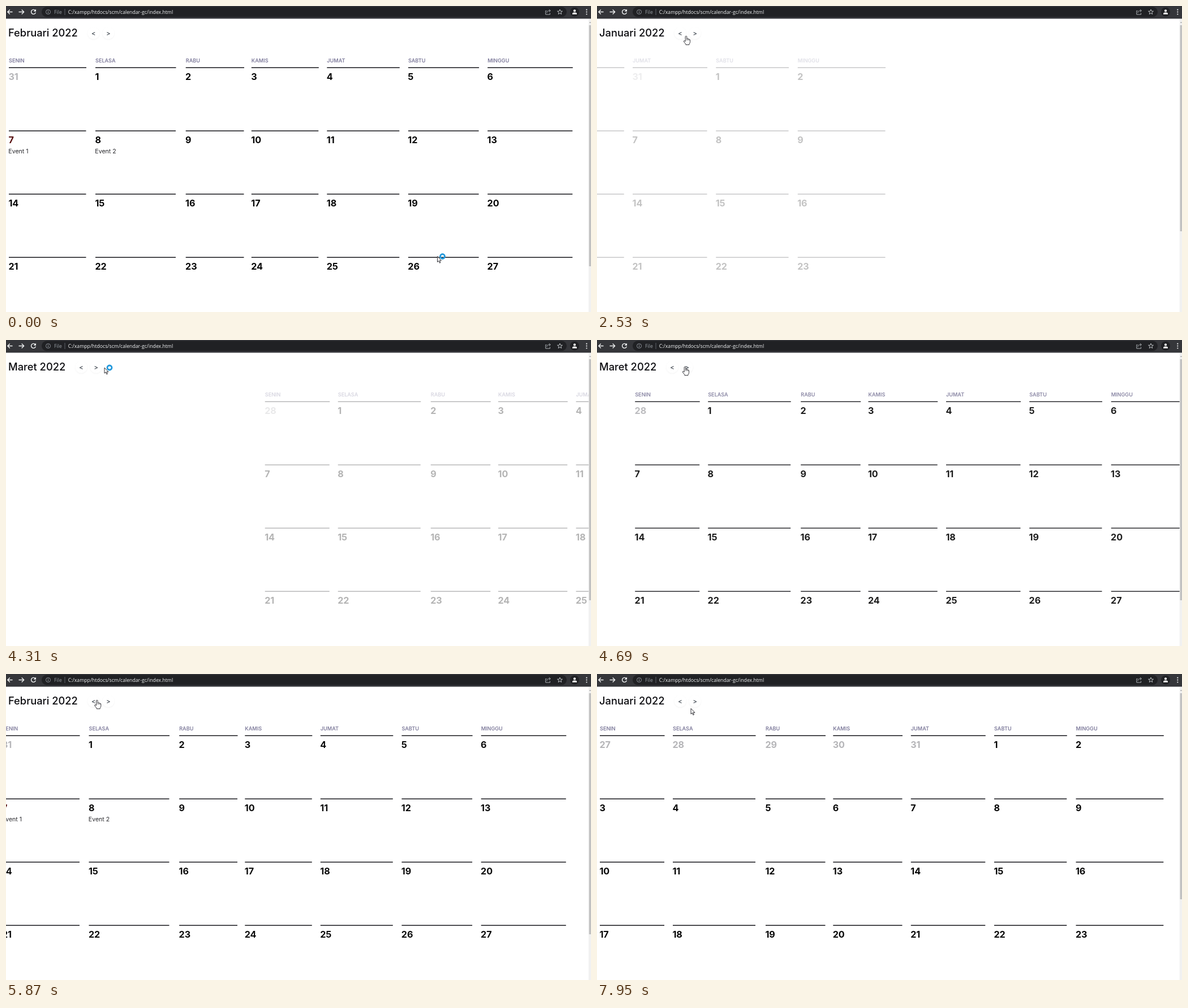
An HTML page with a canvas for the animation above (8 s loop, 1034 px wide and 542 px high).

```html
<!DOCTYPE html>
<html lang="id">
<head>
<meta charset="utf-8">
<title>Calendar</title>
<style>
  html, body { margin: 0; width: 100%; height: 100%; overflow: hidden; background: #fff; }
  canvas { display: block; }
</style>
</head>
<body>
<canvas id="stage" width="1034" height="542"></canvas>
<script>
const ctx = document.getElementById('stage').getContext('2d');
const LOOP = 8000, SLIDE_TIME = 750, SLIDE_DISTANCE = 648;
const INTER = 'Inter, "Open Sans", sans-serif';
const DAYS = ['SENIN', 'SELASA', 'RABU', 'KAMIS', 'JUMAT', 'SABTU', 'MINGGU'];

// Left and right edge of each weekday column
const NARROW = [[5, 119], [134, 280], [298, 403.5], [417.3, 539.5], [554.8, 686.3], [702, 830.3], [846.5, 1001.3]];
const WIDE = [[5, 141.5], [158, 300], [317.7, 420.5], [433.8, 552.3], [567.3, 695.3], [710.9, 835.6], [851.2, 1001.3]];
const MONTHS = [
  { title: 'Januari 2022', prevX: 147, columns: NARROW, thumbEnd: 399 },
  { title: 'Februari 2022', prevX: 154.7, columns: WIDE, thumbEnd: 461, today: 7, events: { 7: 'Event 1', 8: 'Event 2' } },
  { title: 'Maret 2022', prevX: 133, columns: NARROW, thumbEnd: 461 }
];

const VIEWS = [
  { from: 0, slide: -SLIDE_TIME, month: 1, side: 1 },
  { from: 2380, slide: 2400, month: 0, side: -1 },
  { from: 3370, slide: 3430, month: 1, side: 1 },
  { from: 4158, slide: 4158, month: 2, side: 1 },
  { from: 5246, slide: 5246, month: 1, side: -1 },
  { from: 6137, slide: 6137, month: 0, side: -1 }
];

// Time, tip position, pointer kind
const POINTER = [
  [0, 762.5, 443.5, 'busy'], [70, 756, 440, 'busy'], [450, 480, 295, 'busy'], [810, 300, 181, 'busy'],
  [1200, 130, 70, 'busy'], [1450, 50, 22, 'busy'], [1660, 26, 30, 'busy'], [1900, 85, 45, 'arrow'],
  [2050, 150, 56, 'hand'], [2130, 157.5, 53, 'hand'], [2600, 157.5, 53, 'hand'],
  [2990, 174, 49, 'busy'], [3220, 174.5, 48.5, 'hand'], [4158, 174, 49, 'busy'],
  [4470, 174, 49, 'hand'], [4790, 137, 45, 'hand'], [5020, 137, 45, 'hand'],
  [5100, 141.3, 46, 'busy'], [5480, 141.3, 46, 'hand'], [5800, 160.8, 46, 'hand'], [6560, 160.8, 46, 'hand'],
  [6780, 172, 68, 'arrow'], [6860, 172, 68, 'arrow'], [7010, 166, 61, 'arrow'], [7100, 166, 61, 'arrow'],
  [7540, 257, 171, 'arrow'], [7950, 166, 61, 'arrow'], [LOOP, 166, 61, 'arrow']
];

// The picture refreshes in evenly spaced steps: first, last, count
const BURSTS = [
  [0, 0, 1], [70, 810, 11], [890, 1660, 11], [1740, 2130, 6], [2380, 3140, 11], [3220, 3220, 1],
  [3370, 4080, 10], [4230, 4870, 9], [5020, 5180, 3], [5330, 6020, 10], [6170, 6860, 10],
  [7010, 7010, 1], [7180, 7950, 11]
];

function refreshTime(t) {
  const [first, last, count] = BURSTS.findLast(b => b[0] <= t);
  if (t >= last) return count === 1 ? first : t;
  const step = (last - first) / (count - 1);
  return first + step * Math.floor((t - first + 8) / step);
}

// cubic-bezier(.25, .1, .25, 1)
function ease(x) {
  if (x <= 0) return 0;
  if (x >= 1) return 1;
  let low = 0, high = 1, s;
  for (let i = 0; i < 24; i++) {
    s = (low + high) / 2;
    if (0.75 * s * (1 - s) + s ** 3 < x) low = s; else high = s;
  }
  return 0.3 * (1 - s) ** 2 * s + 3 * (1 - s) * s * s + s ** 3;
}

function text(string, x, y, font, color, align = 'left') {
  ctx.font = font;
  ctx.fillStyle = color;
  ctx.textAlign = align;
  ctx.fillText(string, x, y);
}

function box(x, y, w, h, color, radius = 0) {
  ctx.fillStyle = color;
  ctx.beginPath();
  ctx.roundRect(x, y, w, h, radius);
  ctx.fill();
}

function disc(x, y, r, color) {
  ctx.fillStyle = color;
  ctx.beginPath();
  ctx.arc(x, y, r, 0, Math.PI * 2);
  ctx.fill();
}

function stroke(path, color, width) {
  ctx.strokeStyle = color;
  ctx.lineWidth = width;
  ctx.stroke(new Path2D(path));
}

function ring(x, y, r, color, width) {
  ctx.strokeStyle = color;
  ctx.lineWidth = width;
  ctx.beginPath();
  ctx.arc(x, y, r, 0, Math.PI * 2);
  ctx.stroke();
}

function drawToolbar() {
  box(0, 0, 1034, 22.5, '#35363a');
  box(63, 1.5, 928, 18, '#202124', 9);
  stroke('M11.5 10.5H3M6.8 6.5L2.8 10.5L6.8 14.5', '#f1f3f4', 1.3);
  stroke('M22.5 10.5H31M27.7 6.5L31.7 10.5L27.7 14.5', '#f1f3f4', 1.3);
  stroke('M51.8 8A4 4 0 1 0 52.4 11.5', '#f1f3f4', 1.4);
  ctx.fillStyle = '#f1f3f4';
  ctx.fill(new Path2D('M53 5.5V9.8H48.7Z'));
  ring(74.5, 10.5, 4, '#9aa0a6', 0.9);
  box(74, 9.8, 1, 3, '#9aa0a6');
  box(74, 7.9, 1, 1, '#9aa0a6');
  const font = '8.7px "Open Sans", "Noto Sans", sans-serif';
  text('File', 85, 13.8, font, '#9aa0a6');
  box(103.5, 5, 1, 11, '#5f6368');
  text('C:/xampp/htdocs/scm/calendar-gc/index.html', 109.8, 13.8, font, '#f1f3f4');

  stroke('M955.5 8.5H953.8V15H961.5V12.5M956 12C956 9 958 8.3 962 8.3M959.8 6L962.3 8.3L959.8 10.6', '#bdc1c6', 0.9);
  ctx.beginPath();
  for (let i = 0; i < 10; i++) {
    const r = i % 2 ? 2 : 4.7, a = i * Math.PI / 5 - Math.PI / 2;
    ctx.lineTo(979 + r * Math.cos(a), 10.7 + r * Math.sin(a));
  }
  ctx.closePath();
  ctx.strokeStyle = '#c8ccd0';
  ctx.lineWidth = 0.9;
  ctx.stroke();
  disc(1005, 10.5, 8, '#202124');
  disc(1005, 8.4, 2.1, '#fff');
  box(1001, 11.4, 8, 3.4, '#fff', [2.5, 2.5, 0, 0]);
  for (const y of [6.7, 10.6, 14.5]) disc(1026.3, y, 1.1, '#f1f3f4');
}

function drawHeading({ title, prevX }) {
  text(title, 4, 54, `500 18.3px ${INTER}`, '#0b0b0f');
  ['<', '>'].forEach((sign, i) => {
    const x = prevX + 26.2 * i;
    ctx.save();
    ctx.shadowColor = 'rgba(0, 0, 0, .05)';
    ctx.shadowBlur = 3;
    ctx.shadowOffsetY = 1;
    disc(x, 48, 10.5, '#fff');
    ctx.restore();
    text(sign, x, 52, `600 11px ${INTER}`, '#50575f', 'center');
  });
}

function drawGrid(monthIndex) {
  const { columns, today, events = {} } = MONTHS[monthIndex];
  const lead = (new Date(2022, monthIndex, 1).getDay() + 6) % 7;
  columns.forEach(([left, right], col) => {
    text(DAYS[col], left, 99.8, `600 9.1px ${INTER}`, '#7f7c9c');
    for (let row = 0; row < 4; row++) {
      const top = 109.3 + 112 * row;
      const date = new Date(2022, monthIndex, 1 - lead + col + 7 * row);
      const day = date.getDate(), inside = date.getMonth() === monthIndex;
      box(left, top - 0.7, right - left + (row ? 0 : 0.5), 1.4, '#15151a');
      const color = !inside ? '#b5b5b8' : day === today ? '#560d0d' : '#050505';
      text(day, left - 0.6, top + 22, `700 16.15px ${INTER}`, color);
      if (inside && events[day]) text(events[day], left - 0.7, top + 151.7 - 112 + 112 - 0 - 112 + 0, `400 10.6px ${INTER}`, '#26262a');
    }
  });
}

function drawScrollbar({ thumbEnd }) {
  box(1029.7, 22.5, 4.3, 519.5, '#f1f1f1');
  box(1030.5, 34, 3.5, thumbEnd - 34, '#c1c1c1');
  ctx.fillStyle = '#a0a0a0';
  ctx.fill(new Path2D('M1030.8 30L1032.4 28L1034 30Z'));
}

const ARROW = new Path2D('M0 0V10L2.3 7.9L3.9 11.7L5.5 11L3.9 7.4H7Z');
const HAND = new Path2D('M-1.3 1Q0 -.6 1.3 1V5Q2.8 4 3.5 5.4Q5 4.7 5.5 6.2Q7 5.8 7 7.5V10.5Q7 13 5.4 14.2V15.7H-.6V14.4L-4 10.3Q-4.6 8.3 -2.7 8.6L-1.3 9.8Z');

function drawPointer(t) {
  const i = POINTER.findLastIndex(p => p[0] <= t);
  const [t0, x0, y0, kind] = POINTER[i];
  const [t1, x1, y1] = POINTER[i + 1];
  const k = (t - t0) / (t1 - t0);
  ctx.save();
  ctx.translate(x0 + (x1 - x0) * k, y0 + (y1 - y0) * k);
  const shape = kind === 'hand' ? HAND : ARROW;
  ctx.fillStyle = '#fff';
  ctx.fill(shape);
  ctx.strokeStyle = '#1c1c22';
  ctx.lineWidth = 0.9;
  ctx.stroke(shape);
  if (kind === 'hand') stroke('M1.3 5V8M3.5 5.6V8M5.5 6.4V8', '#1c1c22', 0.7);
  if (kind === 'busy') ring(9, 0, 4, '#2399dc', 2.8);
  ctx.restore();
}

function draw(now) {
  const t = refreshTime(now % LOOP);
  const view = VIEWS.findLast(v => v.from <= t);
  const month = MONTHS[view.month];
  const progress = ease((t - view.slide) / SLIDE_TIME);

  box(0, 0, 1034, 542, '#fff');
  drawHeading(month);
  ctx.save();
  ctx.globalAlpha = progress;
  ctx.translate(view.side * SLIDE_DISTANCE * (1 - progress), 0);
  drawGrid(view.month);
  ctx.restore();
  drawScrollbar(month);
  drawToolbar();
  drawPointer(t);
}

const start = performance.now();
function tick() {
  draw(performance.now() - start);
  requestAnimationFrame(tick);
}
tick();
</script>
</body>
</html>
```
